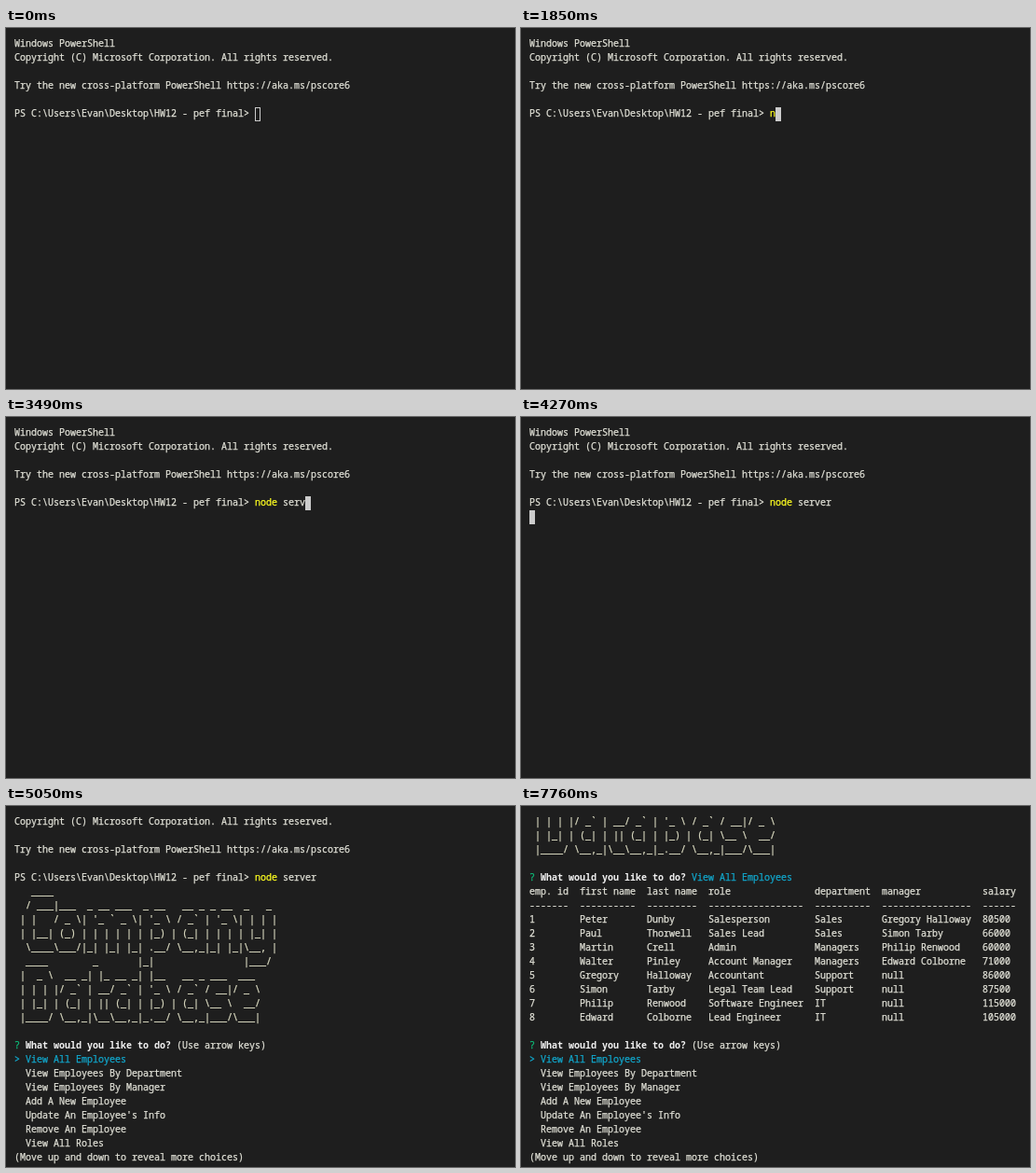
These frames come from a looping animation (546 by 387 pixels, 8 s). An HTML page:

```html
<!DOCTYPE html>
<html lang="en">
<head>
<meta charset="utf-8">
<title>Terminal</title>
<style>
  html, body { margin: 0; width: 100%; height: 100%; overflow: hidden; background: #1e1e1e; }
  svg { display: block; }
  text { font: 10px "Noto Sans Mono", "DejaVu Sans Mono", monospace; font-variant-ligatures: none; white-space: pre; }
  text, tspan { fill: currentColor; stroke: currentColor; stroke-width: 0.25px; }
  text { color: #e2e2d8; }
  .art { color: #dedec4; }
  .yellow { color: #ffff20; }
  .green { color: #0dbc79; }
  .cyan { color: #11a8cd; }
  .bold { color: #f0f0f0; font-weight: bold; stroke: none; }
</style>
</head>
<body>
<svg width="546" height="387" viewBox="0 0 546 387">
  <g id="screen"></g>
  <rect id="cursor"/>
</svg>
<script>
const LOOP = 8000, LEFT = 9, TOP = 10, CELL = 6, ROW = 15;
const KEY_TIMES = [1850, 2000, 2320, 2470, 2640, 2880, 3030, 3260, 3490, 3660, 3890];
const FOCUS = 460, ENTER = 4270, BANNER = 4900, MENU = 5050, CHOSEN = 7680, TABLE = 7760;
const COMMAND = "node server";
const PROMPT = String.raw`PS C:\Users\Evan\Desktop\HW12 - pef final> `;

const paint = (cls, s) => `<tspan class="${cls}">${s}</tspan>`;

const intro = [
  "Windows PowerShell",
  "Copyright (C) Microsoft Corporation. All rights reserved.",
  "",
  "Try the new cross-platform PowerShell https://aka.ms/pscore6",
  ""
];

// A double quote stands for a backtick here.
const banner = String.raw`
   ____
  / ___|___  _ __ ___  _ __   __ _ _ __  _   _
 | |   / _ \| '_ " _ \| '_ \ / _" | '_ \| | | |
 | |__| (_) | | | | | | |_) | (_| | | | | |_| |
  \____\___/|_| |_| |_| .__/ \__,_|_| |_|\__, |
  ____        _       |_|                |___/
 |  _ \  __ _| |_ __ _| |__   __ _ ___  ___
 | | | |/ _" | __/ _" | '_ \ / _" / __|/ _ \
 | |_| | (_| | || (_| | |_) | (_| \__ \  __/
 |____/ \__,_|\__\__,_|_.__/ \__,_|___/\___|`
  .slice(1).replace(/"/g, "`").split("\n").map(s => paint("art", s));

const question = paint("green", "?") + paint("bold", " What would you like to do? ");
const menu = [
  question + "(Use arrow keys)",
  paint("cyan", "> View All Employees"),
  "  View Employees By Department",
  "  View Employees By Manager",
  "  Add A New Employee",
  "  Update An Employee's Info",
  "  Remove An Employee",
  "  View All Roles",
  "(Move up and down to reveal more choices)"
];

const widths = [7, 10, 9, 17, 10, 16, 6];
const tableRow = cells => cells.map((c, i) => c.padEnd(widths[i])).join("  ");
const staff = [
  "Peter,Dunby,Salesperson,Sales,Gregory Halloway,80500",
  "Paul,Thorwell,Sales Lead,Sales,Simon Tarby,66000",
  "Martin,Crell,Admin,Managers,Philip Renwood,60000",
  "Walter,Pinley,Account Manager,Managers,Edward Colborne,71000",
  "Gregory,Halloway,Accountant,Support,null,86000",
  "Simon,Tarby,Legal Team Lead,Support,null,87500",
  "Philip,Renwood,Software Engineer,IT,null,115000",
  "Edward,Colborne,Lead Engineer,IT,null,105000"
];
const table = [
  tableRow("emp. id,first name,last name,role,department,manager,salary".split(",")),
  tableRow(widths.map(w => "-".repeat(w))),
  ...staff.map((s, i) => tableRow([`${i + 1}`, ...s.split(",")]))
];

const commandLine = n =>
  PROMPT + paint("yellow", COMMAND.slice(0, Math.min(n, 4))) + COMMAND.slice(4, n);

// Lines on the screen and the cursor cell [column, row], if shown.
function state(t) {
  const typed = KEY_TIMES.filter(k => k <= t).length;
  const start = [...intro, commandLine(typed)];
  if (t < ENTER) return { lines: start, cursor: [PROMPT.length + typed, 5] };
  if (t < BANNER) return { lines: start, cursor: [0, 6] };
  const full = [...start, ...banner, ""];
  if (t < MENU) return { lines: full, cursor: [0, 17] };
  if (t < CHOSEN) return { lines: [...full, ...menu].slice(1) };
  if (t < TABLE) return { lines: full.slice(1) };
  return { lines: [...full, question + paint("cyan", "View All Employees"), ...table, "", ...menu].slice(-25) };
}

const screenEl = document.getElementById("screen");
const cursorEl = document.getElementById("cursor");
let shown = "";

function setAttrs(el, attrs) {
  for (const name in attrs) el.setAttribute(name, attrs[name]);
}

function draw() {
  const t = performance.now() % LOOP;
  const { lines, cursor } = state(t);
  const markup = lines.map((s, i) =>
    `<text x="${LEFT}" y="${TOP + ROW * i + 10}">${s}</text>`).join("");
  if (markup !== shown) screenEl.innerHTML = shown = markup;

  cursorEl.style.display = cursor ? "" : "none";
  if (cursor) {
    const hollow = t < FOCUS, inset = hollow ? 0.5 : 0;
    setAttrs(cursorEl, {
      x: LEFT + CELL * cursor[0] + inset,
      y: TOP + ROW * cursor[1] + inset,
      width: CELL - 2 * inset,
      height: ROW - 2 * inset,
      fill: hollow ? "none" : "#cccccc",
      stroke: hollow ? "#cccccc" : "none"
    });
  }
  requestAnimationFrame(draw);
}
draw();
</script>
</body>
</html>
```
